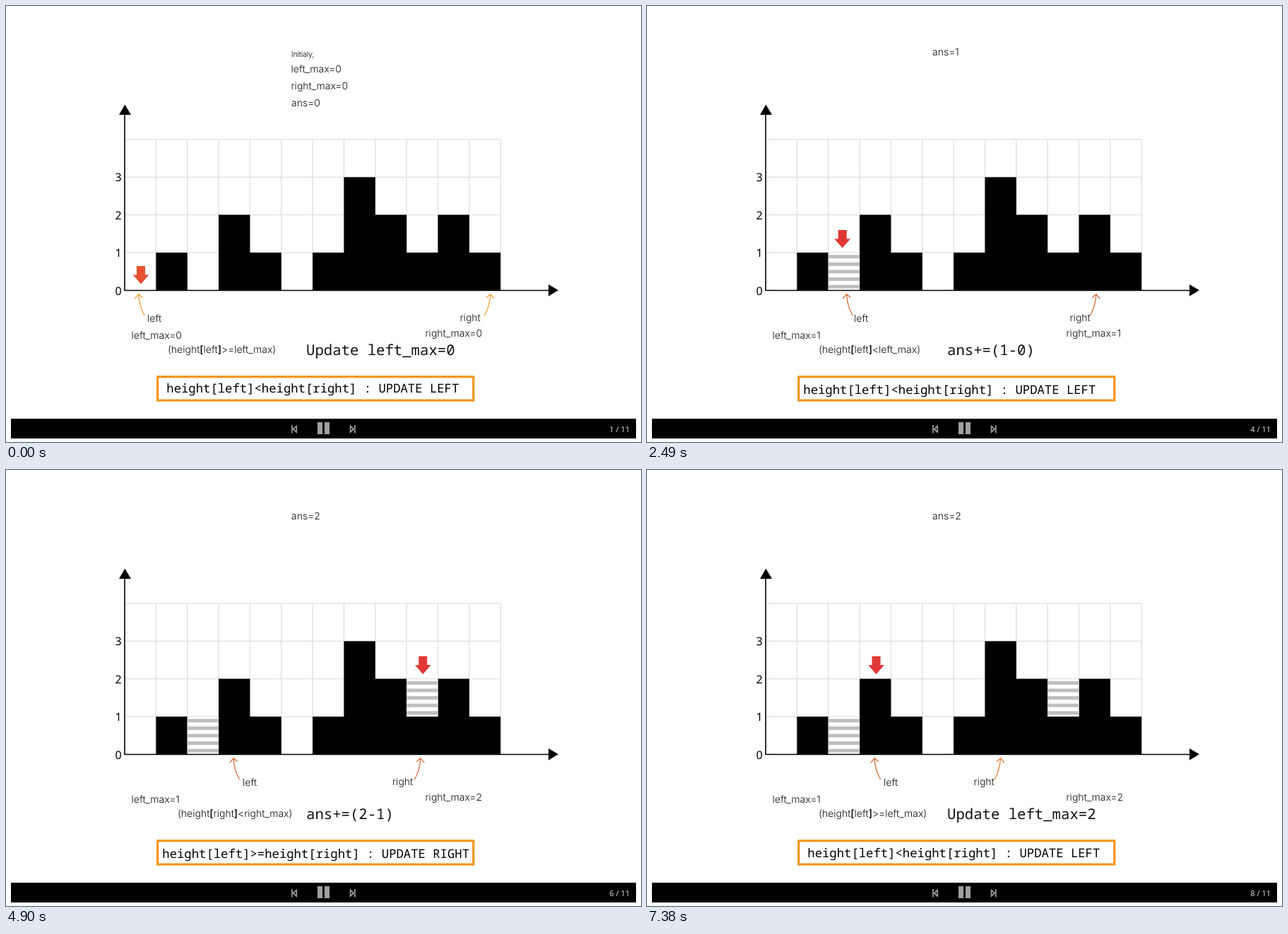
These frames come from a looping animation (899x617 px, 8000 ms). An HTML page:

```html
<!DOCTYPE html>
<html lang="en">
<head>
<meta charset="utf-8">
<title>Two pointers</title>
<style>
  html, body { margin: 0; width: 100%; height: 100%; overflow: hidden; background: #fff; }
  svg { display: block; width: 899px; height: 617px; }
  text { font: 300 14px Inter, sans-serif; fill: #111; text-rendering: geometricPrecision; white-space: pre; }
  .small { font-size: 11px; letter-spacing: -.3px; }
  .axis { font: 400 16px "Noto Sans", sans-serif; text-anchor: end; fill: #000; }
  .action { font: 400 20.65px "Noto Sans Mono", monospace; }
  .rule { font: 400 17.25px "Noto Sans Mono", monospace; fill: #000; }
  .page { font: 400 11px "Noto Sans", sans-serif; text-anchor: end; fill: #d8d8d8; }
  .bracket { font-weight: 600; }
</style>
</head>
<body>
<svg id="stage" viewBox="0 0 899 617"></svg>
<script>
const NS = "http://www.w3.org/2000/svg";
const LOOP = 8000;
const X0 = 168, Y0 = 402.5, CELL_W = 44.35, CELL_H = 53.45;
const HEIGHTS = [0, 1, 0, 2, 1, 0, 1, 3, 2, 1, 2, 1];
const stage = document.getElementById("stage");

function add(tag, attrs, parent = stage) {
  const node = document.createElementNS(NS, tag);
  for (const key in attrs) node.setAttribute(key, attrs[key]);
  parent.appendChild(node);
  return node;
}
function label(x, y, str = "", cls = "") {
  const node = add("text", { x, y, class: cls });
  node.textContent = str;
  return node;
}
const path = (d, attrs, parent) => add("path", { d, ...attrs }, parent);
const colX = i => X0 + i * CELL_W;
const rowY = h => Y0 - h * CELL_H;

// Chart
let grid = "";
for (let i = 1; i <= 12; i++) grid += `M${colX(i)} ${rowY(4)}V${Y0}`;
for (let h = 1; h <= 4; h++) grid += `M${X0} ${rowY(h)}H${colX(12)}`;
path(grid, { stroke: "#e2e2e2", "stroke-width": 1.5, fill: "none" });

let bars = `M${X0} ${Y0}`;
HEIGHTS.forEach((h, i) => bars += `V${rowY(h)}H${colX(i + 1)}`);
path(bars + `V${Y0}Z`, { fill: "#000" });

function hatch(col, row) {
  const g = add("g", {});
  add("rect", { x: colX(col), y: rowY(row) + .7, width: CELL_W, height: CELL_H - 1.2, fill: "#fff" }, g);
  for (let k = 0; k < 5; k++)
    add("rect", { x: colX(col), y: rowY(row) + 3.2 + k * 10.6, width: CELL_W, height: 5, fill: "#bfbfbf" }, g);
  return g;
}
const water = [hatch(2, 1), hatch(9, 2)];

path(`M${X0} 150V${Y0}H770`, { stroke: "#000", "stroke-width": 1.6, fill: "none" });
path("M168.3 139.5L177 154H160ZM782 402.3L768 394V410.7Z", { fill: "#000" });
for (let h = 0; h <= 3; h++) label(163.6, rowY(h) + 6.2, h, "axis");

// Frame and player bar
add("rect", { x: 214.7, y: 524.7, width: 447.1, height: 33.4, fill: "#fff", stroke: "#f7941e", "stroke-width": 3.2 });
add("rect", { x: 7, y: 584, width: 885, height: 28, fill: "#000" });
path("M441 589h7v17h-7zM451 589h7v17h-7z", { fill: "#a0a0a0" });
const skip = { fill: "none", stroke: "#a0a0a0", "stroke-width": 1.7 };
path("M405 593V604.5M411.2 594.6V603L406.6 598.8Z", skip);
path("M493.8 593V604.5M487.6 594.6V603L492.2 598.8Z", skip);

// Moving parts
const marker = path("M-6 0H6V12.5H11.3L0 25.5L-11.3 12.5H-6Z", {});
function pointer(dir) {
  return path(`M0 0Q${dir} 17 ${dir * 8.5} 30M${-dir * 5} 6L0 0L${dir * 5.3} 4.5`,
    { fill: "none", "stroke-width": 1.3, "stroke-linecap": "round", "stroke-linejoin": "round" });
}
const leftPtr = pointer(1), rightPtr = pointer(-1);
const leftTag = label(0, 447, "left"), rightTag = label(0, 446, "right");
const leftMax = label(177.5, 470.5), rightMax = label(593.5, 468);
const cond = label(0, 491.3), action = label(425, 493.5, "", "action");
const rule = label(0, 0, "", "rule"), page = label(883, 603, "", "page");
const ans = label(404, 0);
const intro = [
  label(403.8, 72, "Initialy,", "small"),
  label(403.5, 94, "left_max=0"),
  label(403.5, 118, "right_max=0")
];

const ORANGE = "#f59a2c", RUST = "#d9683a";
// Pointer tips and tag positions by column
const LEFT = { 0: [187.5, 200, ORANGE], 1: [241, 251, RUST], 2: [282.5, 293, RUST], 3: [322, 335, RUST] };
const RIGHT = { 11: [686, 642.5, ORANGE], 10: [636, 598.5, RUST], 9: [587, 547, RUST], 8: [544, 505, RUST], 7: [500.5, 462.5, "#e5803a"] };

// at, left, right, side, left_max, right_max, ans, marker x, marker y, update or sum
const STEPS = [
  [0,    0, 11, "left",  0, 0, 0, 191,   368, "0"],
  [70,   1, 11, "right", 0, 0, 0, 681.5, 317, "1"],
  [1310, 1, 10, "left",  0, 1, 0, 235,   317, "1"],
  [2490, 2, 10, "left",  1, 1, 1, 276.7, 317, "(1-0)"],
  [3720, 3, 10, "right", 1, 1, 1, 634,   263.5, "2"],
  [4900, 3, 9,  "right", 1, 2, 2, 590.3, 263.5, "(2-1)"],
  [6150, 3, 8,  "right", 1, 2, 2, 546,   263.5, "2"],
  [7380, 3, 7,  "left",  1, 2, 2, 324.5, 263.5, "2"]
];
const PAGES = [0, 70, 1310, 2490, 3720, 4900, 6060, 7310];

function place(ptr, tag, [tip, x, color]) {
  ptr.setAttribute("transform", `translate(${tip} 407.8)`);
  ptr.setAttribute("stroke", color);
  tag.setAttribute("x", x);
}
function setCondition(side, op) {
  cond.textContent = "";
  for (const part of ["(height", "[", side, "]", `${op}${side}_max)`])
    add("tspan", part === "[" || part === "]" ? { class: "bracket" } : {}, cond).textContent = part;
}
function show(n) {
  const [, l, r, side, lMax, rMax, total, mx, my, value] = STEPS[n];
  const sum = value[0] === "(", first = n === 0, last = n === STEPS.length - 1;
  marker.setAttribute("transform", `translate(${mx} ${my})`);
  marker.setAttribute("fill", first ? "#e7512f" : "#e03834");
  place(leftPtr, leftTag, LEFT[l]);
  place(rightPtr, rightTag, RIGHT[r]);
  leftMax.textContent = `left_max=${lMax}`;
  rightMax.textContent = `right_max=${rMax}`;
  ans.textContent = `ans=${total}`;
  ans.setAttribute("y", first ? 142 : 69.5);
  intro.forEach(t => t.style.display = first ? "" : "none");
  water.forEach((g, i) => g.style.display = total > i ? "" : "none");
  setCondition(side, sum ? "<" : ">=");
  cond.setAttribute("x", n < 2 ? 229 : 243);
  action.textContent = sum ? `ans+=${value}` : `Update ${side}_max=${value}`;
  rule.textContent = `height[left]${side === "left" ? "<" : ">="}height[right] : UPDATE ${side.toUpperCase()}`;
  rule.setAttribute("x", first || last ? 227.3 : 221.3);
  rule.setAttribute("y", first ? 546.5 : last ? 547.5 : 548.7);
}

let step = -1;
function tick() {
  const t = performance.now() % LOOP;
  const n = STEPS.filter(s => s[0] <= t).length - 1;
  if (n !== step) show(step = n);
  const text = `${PAGES.filter(at => at <= t).length} / 11`;
  if (page.textContent !== text) page.textContent = text;
  requestAnimationFrame(tick);
}
tick();
</script>
</body>
</html>
```
